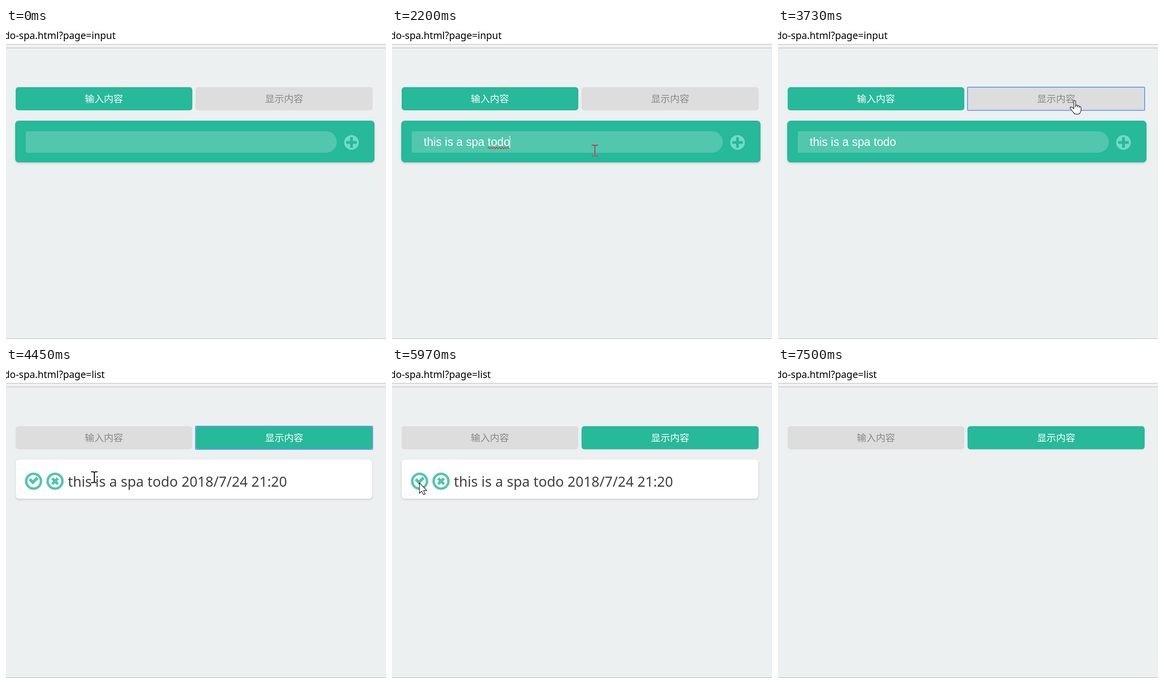
These frames come from a looping animation (826x678 px, 7.86 s). An HTML page:

```html
<!DOCTYPE html>
<html lang="zh-CN">
<head>
<meta charset="utf-8">
<title>Todo SPA</title>
<style>
  html, body { margin: 0; width: 100%; height: 100%; overflow: hidden; background: #ecf0f1; }
  svg { display: block; width: 100%; height: 100%; }
  text { white-space: pre; }
  .url { font: 21.2px "Noto Sans", sans-serif; }
  .tab rect { fill: #ddd; }
  .tab text { font: 300 20.8px "Noto Sans CJK SC", "Noto Sans CJK", sans-serif; text-anchor: middle; fill: #888; }
  .tab.active rect { fill: #26b99a; }
  .tab.active text { fill: #fff; }
  .typed { font: 25px "Liberation Sans", Arial, sans-serif; fill: #fff; }
  .item { font: 30.3px "Noto Sans", sans-serif; fill: #404040; }
  .shadow { filter: drop-shadow(0 2px 2px rgba(0, 0, 0, .15)); }
  .pointer { fill: #fff; stroke: #111; stroke-width: 1.2; stroke-linejoin: round; }
  #ibeam { mix-blend-mode: difference; }
</style>
</head>
<body>
<svg viewBox="0 0 826 678">
  <rect width="826" height="678" fill="#ecf0f1"/>
  <rect width="826" height="36" fill="#fff"/>
  <rect y="36" width="826" height="8" fill="#f2f2f2"/>
  <path d="M0 35.5H826M0 43.5H826M0 677.5H826" stroke="#b4b3b0"/>
  <text id="url" class="url" x="-4.7" y="24"></text>

  <g id="tabInput" class="tab">
    <rect x="21" y="129" width="384" height="50.5" rx="6"/>
    <text x="212.8" y="162">输入内容</text>
  </g>
  <g id="tabList" class="tab">
    <rect x="412" y="129" width="385" height="50.5" rx="6"/>
    <text x="604.5" y="162">显示内容</text>
  </g>
  <rect id="focus" x="412" y="129" width="385" height="50.5" rx="1" fill="none" stroke="#669df3" stroke-width="2"/>

  <g id="inputPage">
    <rect class="shadow" x="20" y="202" width="781" height="91" rx="8" fill="#26b99a"/>
    <path d="M46 225H695.5a23.5 23.5 0 0 1 0 47H46a3 3 0 0 1-3-3V228a3 3 0 0 1 3-3z" fill="#52c7ae"/>
    <circle cx="751" cy="249.5" r="16" fill="#70dbc6"/>
    <path d="M742.5 249.5h17M751 241v17" stroke="#26b99a" stroke-width="6" stroke-linecap="square" stroke-linejoin="round"/>
    <text id="typed" class="typed" x="69" y="257">this is a spa todo</text>
    <path id="squiggle" fill="none" stroke="#e02a20" stroke-width="1.5"/>
    <rect id="caret" y="235" width="1.3" height="28" fill="#fff"/>
  </g>

  <g id="listPage">
    <rect class="shadow" x="21" y="202" width="775" height="85" rx="7" fill="#fff"/>
    <g transform="translate(60 249)" fill="#53c5ad" stroke="#53c5ad">
      <circle r="16.1" fill="none" stroke-width="5.4"/>
      <path d="M-9.4-2.2L-1.6 5.6 9.4-5.3 6.3-8.5-1.6-.6-6.3-5.3z" stroke-width="2.2" stroke-linejoin="round"/>
    </g>
    <g transform="translate(106.6 249)" fill="none" stroke="#53c5ad">
      <circle r="16.1" stroke-width="5.4"/>
      <path d="M-6.2-6.2L6.2 6.2M-6.2 6.2L6.2-6.2" stroke-width="6.2"/>
    </g>
    <text class="item" x="134.5" y="261">this is a spa todo 2018/7/24 21:20</text>
  </g>

  <g id="arrow" class="pointer">
    <path d="M.5.5V23.5L5.6 18.8 9.6 26.5 13.2 24.9 9.5 17.3H16.6z"/>
  </g>
  <g id="hand" class="pointer">
    <path d="M-2 18V2a2 2 0 0 1 4 0V11q2.4-2 4.2.6 2.6-1 4 1.2 3.2-.4 3.4 3V21q0 3.400-2 6-1 2.600-4 2.600H1.500Q-1 29.600-3 26L-9.600 17.500q-1.200-3.200 1.400-3.300Q-5.500 14.500-2 18z"/>
    <path d="M2 10v5M6.200 11.600v4M10.200 12.800v3.500" fill="none"/>
  </g>
  <g id="ibeam">
    <path d="M-7-11.500h5l2 1.500 2-1.500h5M-7 12h5l2-1.500 2 1.500h5M0-10.500V11" fill="none" stroke="#fff" stroke-width="2"/>
  </g>
</svg>
<script>
const LOOP = 7860;
const $ = id => document.getElementById(id);
const show = (id, on) => { $(id).style.display = on ? "" : "none"; };
const between = (v, a, b) => v >= a && v < b;

// Mouse hotspot: time, x, y
const mouse = [
  [150, 604, 660], [400, 520, 490], [650, 400, 330], [910, 335, 263],
  [1010, 335, 263], [1230, 339, 260], [2050, 339, 260],
  [2420, 590, 276], [2790, 741, 241], [2850, 741, 241], [2900, 742, 241],
  [3120, 742, 241], [3200, 738, 250], [3350, 690, 200], [3470, 645, 158],
  [4010, 645, 158], [4210, 430, 195], [4450, 192, 240], [4780, 76, 252],
  [5120, 59, 252], [6210, 59, 252], [6500, 102, 248], [6950, 102, 248],
  [7500, 290, 690]
];

function mouseAt(t) {
  const i = mouse.findIndex(key => key[0] > t);
  if (i < 1) return null;
  const [t0, x0, y0] = mouse[i - 1], [t1, x1, y1] = mouse[i];
  const k = (t - t0) / (t1 - t0);
  return [Math.round(x0 + (x1 - x0) * k), Math.round(y0 + (y1 - y0) * k)];
}

function pointerKind(x, y, onList, hasItem) {
  if (between(y, 129, 180) && between(x, 21, 797)) return "hand";
  const overInput = !onList && between(x, 43, 719) && between(y, 225, 272);
  const overItem = hasItem && between(x, 135, 611) && between(y, 230, 268);
  return overInput || overItem ? "ibeam" : "arrow";
}

function draw(t) {
  const onList = t >= 3830;
  const hasItem = onList && t < 6950;

  $("url").textContent = "do-spa.html?page=" + (onList ? "list" : "input");
  $("tabInput").classList.toggle("active", !onList);
  $("tabList").classList.toggle("active", onList);
  show("focus", between(t, 3730, 5060));

  show("inputPage", !onList);
  show("typed", t >= 1790);
  show("squiggle", between(t, 1830, 2900));
  show("caret", between(t, 1010, 1510) || between(t, 1830, 2330));
  $("caret").setAttribute("x", t < 1790 ? 69 : 255.5);

  show("listPage", hasItem);
  $("listPage").style.opacity = between(t, 5150, 5970) ? 0.5 : 1;

  const at = mouseAt(t);
  const kind = at && pointerKind(...at, onList, hasItem);
  for (const id of ["arrow", "hand", "ibeam"]) {
    show(id, id === kind);
    if (id === kind) $(id).setAttribute("transform", `translate(${at})`);
  }
}

$("squiggle").setAttribute("d", "M208 261.500q1.500-3 3 0" + "t3 0".repeat(15));

const start = performance.now();
function tick() {
  draw((performance.now() - start) % LOOP);
  requestAnimationFrame(tick);
}
tick();
</script>
</body>
</html>
```
